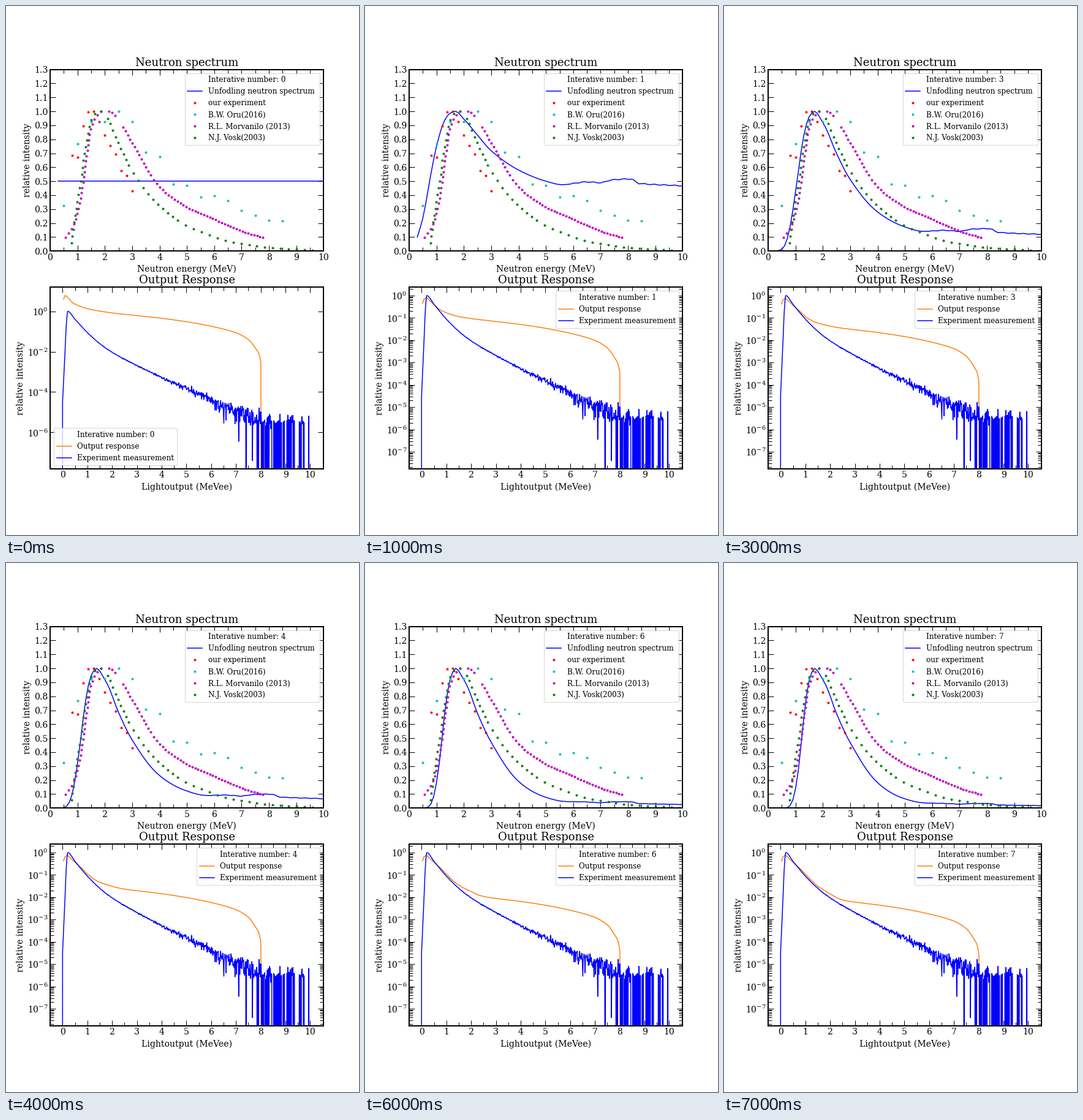
Recreate the animation shown at these times as a matplotlib script. Size 576 by 864 pixels, loop 8000 ms.

```python
import numpy as np
import matplotlib.pyplot as plt
from matplotlib.animation import FuncAnimation
from matplotlib.ticker import (LogLocator, MultipleLocator, NullFormatter,
                               NullLocator)

plt.rcParams.update({
    "font.family": "DejaVu Serif", "mathtext.fontset": "dejavuserif",
    "font.size": 14, "axes.titlesize": 18, "axes.labelsize": 14,
    "legend.fontsize": 12, "axes.linewidth": 2,
    "xtick.top": True, "ytick.right": True,
})
for axis in ("xtick", "ytick"):
    plt.rcParams.update({
        f"{axis}.direction": "in",
        f"{axis}.major.size": 9, f"{axis}.minor.size": 6,
        f"{axis}.major.width": 1, f"{axis}.minor.width": 1,
    })

STEPS = 8
TINY = 1e-20


def curve(x, points):
    """Shape-preserving cubic through (x, y) key points."""
    px, py = np.array(points, float).T
    x = np.clip(x, px[0], px[-1])
    d = np.diff(py) / np.diff(px)
    inner = 2 * np.maximum(d[1:] * d[:-1], 0) / (d[1:] + d[:-1] + 1e-12)
    m = np.r_[d[0], inner, d[-1]]
    i = np.clip(np.searchsorted(px, x, "right") - 1, 0, len(px) - 2)
    h = px[i + 1] - px[i]
    t = (x - px[i]) / h
    return (py[i] * (1 + 2 * t) * (1 - t) ** 2 + py[i + 1] * t * t * (3 - 2 * t)
            + h * t * (1 - t) * (m[i] * (1 - t) - m[i + 1] * t))


def spread(points, lo, hi, n):
    """n x-positions evenly spaced along the drawn curve."""
    x = np.linspace(lo, hi, 400)
    step = np.hypot(45 * np.diff(x), 228 * np.diff(curve(x, points)))
    s = np.r_[0, np.cumsum(step)]
    return np.interp(np.linspace(0, s[-1], n), s, x)


def saturate(n, limit):
    """Grows like n at first, then levels off at the limit."""
    return limit * (1 - np.exp(-n / limit))


# --- reference points ------------------------------------------------------
ours = (np.linspace(0.8, 3, 12),
        [.685, .672, .895, .995, 1, .925, .83, .755, .695, .575, .54, .43])
cyan = (np.linspace(0.5, 8.5, 17),
        [.325, .77, .925, .925, 1, .925, .707, .675, .48, .47, .387, .395,
         .36, .29, .255, .22, .215])

magenta_key = [(.56, .097), (.92, .216), (1.1, .365), (1.3, .637), (1.5, .89),
               (1.88, 1), (2.15, 1), (2.38, .97), (3, .773), (4, .46),
               (5, .314), (6, .227), (7, .143), (7.78, .097)]
magenta_x = np.r_[spread(magenta_key, .56, 1.86, 26), np.linspace(2.15, 2.38, 3),
                  np.linspace(2.67, 3.67, 13), np.linspace(3.79, 7.78, 38)]

green_key = [(.773, .058), (.963, .317), (1.154, .545), (1.3, .759),
             (1.6, .979), (1.86, 1), (2.1, .948), (2.43, .799), (3, .571),
             (4, .322), (5.26, .157), (7, .051), (8.2, .023), (9.9, .002)]
green_x = np.r_[spread(green_key, .773, 1.86, 21),
                np.linspace(2.1, 2.87, 8, endpoint=False),
                np.linspace(2.87, 4.66, 10, endpoint=False),
                np.linspace(4.66, 9.88, 19)]

# --- unfolded spectrum: first estimate raised to a growing power -----------
energy = np.linspace(0.3, 10, 98)
first = curve(energy, [(.3, .1), (.5, .235), (.8, .555), (1, .75), (1.3, .937),
                       (1.5, .987), (1.7, 1), (2, .945), (2.5, .83), (3, .718),
                       (4, .58), (5, .5), (5.6, .475), (6.5, .495), (7, .489),
                       (7.4, .509), (8.1, .516), (8.4, .484), (10, .467)])
first += np.where(energy > 5.8, 0.003 * np.sin(17 * energy), 0)
power_limit = curve(energy, [(.3, 200), (1.5, 200), (1.8, .5), (2, .5),
                             (2.5, 1.1), (3, 1.3), (4, 2.3), (5, 3.6),
                             (7, 7), (10, 9)])


def spectrum(k):
    if k == 0:
        return np.full_like(energy, 0.5)
    return first ** (1 + saturate(k - 1, power_limit))


# --- output response: starting shape lowered step by step ------------------
light = np.r_[np.arange(0.04, 8.02, 0.015), 8.03]
shape = curve(light, [(.04, .6), (.1, .78), (.2, .7), (.4, .43), (.7, .25),
                      (1, .13), (2, -.08), (3, -.21), (4, -.345), (5, -.515),
                      (6, -.74), (7, -1.06), (7.5, -1.4), (7.8, -1.85),
                      (7.93, -2.12), (8.02, -2.6)])
scale = curve(light, [(.04, -.95), (.1, -.94), (.2, -.8), (.4, -.73),
                      (.7, -.85), (1, -.9), (1.5, -.95), (8, -.95)])
drop_limit = curve(light, [(.04, .03), (.7, .03), (1, .2), (1.5, .7),
                           (2, 1.6), (3, 8), (8, 8)])


def response(k):
    log_y = shape.copy()
    if k > 0:
        log_y += scale - saturate(0.19 * (k - 1), drop_limit)
    y = 10 ** log_y
    y[-1] = TINY
    return y


# --- measurement: smooth decay with counting noise and empty bins ----------
def measurement():
    rng = np.random.default_rng(5)
    unit = 10 ** -5.5
    x = np.arange(0, 10.04, 0.015)
    y = 10 ** curve(x, [(0, -4.5), (.1, -2), (.15, -.7), (.21, 0), (.5, -.39),
                        (1, -1.05), (1.5, -1.6), (2, -2.03), (3, -2.69),
                        (4, -3.27), (5, -3.82), (6, -4.4), (7, -4.95),
                        (8, -5.4), (10, -5.7)])
    counts = np.maximum(rng.poisson(y / unit), 1) + rng.normal(0, 0.15, x.size)
    y = np.where(x > 0.3, counts * unit, y)
    late = x > 8.05
    y[late] = np.minimum(y[late], 10 ** -5.1)

    y[(x > 7.75) & (rng.random(x.size) < 0.25)] = TINY
    for lo, hi in ((8.96, 9.05), (9.37, 9.54), (9.76, 9.92), (9.95, 10.1)):
        y[(x > lo) & (x < hi)] = TINY
    for at, level in ((7.11, -6.45), (7.41, -20), (7.67, -7.4)):
        y[np.argmin(abs(x - at))] = 10.0 ** level
    return np.r_[0, x], np.r_[TINY, y]


# --- figure ----------------------------------------------------------------
fig, (top, low) = plt.subplots(2, 1, figsize=(8, 12), dpi=72)
fig.subplots_adjust(left=0.125, right=0.9, top=0.88, bottom=0.125, hspace=0.2)

top_count, = top.plot([], [], " ")
unfolded, = top.plot(energy, spectrum(0), "b", label="Unfodling neutron spectrum ")
for data, color, name in (
        (ours, "r", "our experiment"),
        (cyan, "c", "B.W. Oru(2016)"),
        ((magenta_x, curve(magenta_x, magenta_key)), "m", "R.L. Morvanilo (2013)"),
        ((green_x, curve(green_x, green_key)), "g", "N.J. Vosk(2003)")):
    top.plot(*data, color + ".", label=name)
top.set(xlim=(0, 10), ylim=(0, 1.3), title="Neutron spectrum")
top.set_xlabel("Neutron energy (MeV)", labelpad=5)
top.yaxis.set_major_locator(MultipleLocator(0.1))

low_count, = low.plot([], [], " ")
output, = low.plot(light, response(0), color="tab:orange", label="Output response")
low.plot(*measurement(), "b", label="Experiment measurement")
low.set_yscale("log")
low.set(xlim=(-0.502, 10.542), title="Output Response")
low.set_xlabel("Lightoutput (MeVee)", labelpad=5)

for ax in (top, low):
    ax.set_ylabel("relative intensity")
    ax.xaxis.set_major_locator(MultipleLocator(1))
    ax.xaxis.set_minor_locator(MultipleLocator(0.5))


def set_log_range(lo, hi, base, minor):
    pad = 0.05 * (hi - lo)
    low.set_ylim(10 ** (lo - pad), 10 ** (hi + pad))
    low.yaxis.set_major_locator(LogLocator(base=base, numticks=30))
    low.yaxis.set_minor_locator(minor)
    low.yaxis.set_minor_formatter(NullFormatter())


def update(k):
    unfolded.set_ydata(spectrum(k))
    output.set_ydata(response(k))
    for line in (top_count, low_count):
        line.set_label(f"Interative number: {k}")
    if k == 0:
        set_log_range(-7.4, 0.78, 100, NullLocator())
    else:
        set_log_range(-7.4, 0, 10, LogLocator(subs=range(2, 10), numticks=30))
    top.legend(loc="upper right")
    low.legend(loc="lower left" if k == 0 else "upper right")
    return unfolded, output


anim = FuncAnimation(fig, update, frames=STEPS, interval=1000,
                     repeat=True, repeat_delay=0, blit=False)
plt.show()
```
